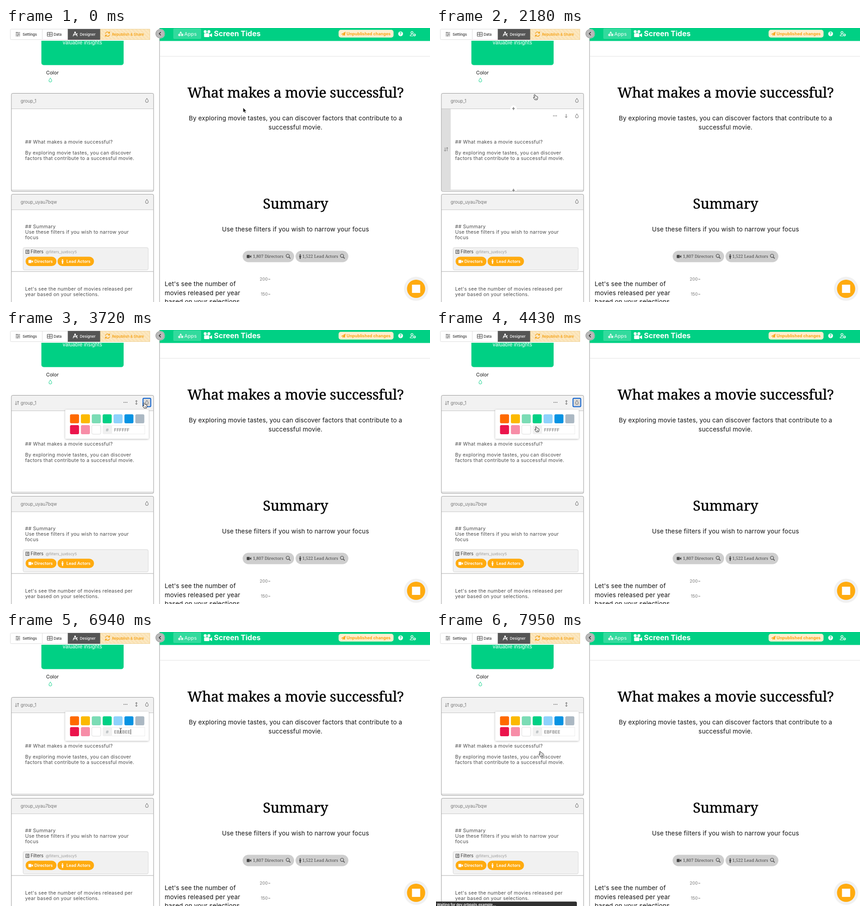
Recreate the animation shown at these times as an HTML page. Size 930 px wide and 602 px high, loop 8000 ms.

```html
<!DOCTYPE html>
<html lang="en">
<head>
<meta charset="utf-8">
<title>Designer</title>
<style>
  html, body { margin: 0; width: 100%; height: 100%; overflow: hidden; background: #fff; }
  svg { display: block; width: 930px; height: 602px; }
  text { font-family: Inter, "Open Sans", sans-serif; white-space: pre; }
  .serif { font-family: "Noto Serif", serif; }
</style>
</head>
<body>
<svg id="stage" viewBox="0 0 930 602" xmlns="http://www.w3.org/2000/svg">
  <defs>
    <pattern id="stripes" width="6" height="6" patternUnits="userSpaceOnUse" patternTransform="rotate(-45)">
      <rect width="6" height="6" fill="#fce9c2"/>
      <rect width="3" height="6" fill="#fae1b4"/>
    </pattern>
    <filter id="shadow" x="-10%" y="-20%" width="120%" height="150%">
      <feDropShadow dx="0" dy="1" stdDeviation="2" flood-color="#000" flood-opacity=".28"/>
    </filter>
  </defs>
</svg>
<script>
const NS = 'http://www.w3.org/2000/svg';
const stage = document.getElementById('stage');
const GREEN = '#00d084', ORANGE = '#ffab10', GREY = '#777';
const LOOP = 8000;

function add(parent, tag, attrs = {}, content) {
  const node = document.createElementNS(NS, tag);
  for (const key in attrs) node.setAttribute(key, attrs[key]);
  if (content !== undefined) node.textContent = content;
  parent.appendChild(node);
  return node;
}
const group = (p, attrs) => add(p, 'g', attrs);
const at = (p, x, y) => group(p, { transform: `translate(${x} ${y})` });
const rect = (p, x, y, width, height, fill, more) => add(p, 'rect', { x, y, width, height, fill, ...more });
const circle = (p, cx, cy, r, fill, more) => add(p, 'circle', { cx, cy, r, fill, ...more });
const fillPath = (p, d, fill) => add(p, 'path', { d, fill });
const linePath = (p, d, stroke, width = 1) => add(p, 'path', { d, stroke, fill: 'none', 'stroke-width': width });
const label = (p, x, y, size, fill, str, more) => add(p, 'text', { x, y, 'font-size': size, fill, ...more }, str);
const show = (node, on) => node.setAttribute('visibility', on ? 'visible' : 'hidden');

// Icons
const drop = (p, x, y, color) => linePath(at(p, x, y),
  'M0-4.4C1-2.3 3.1-.4 3.1 1.5A3.1 3.1 0 0 1-3.1 1.5C-3.1-.4-1-2.3 0-4.4Z', color);
const dots = (p, x, y) => [-3.3, 0, 3.3].forEach(d => circle(p, x + d, y, .9, '#666'));
const sorter = (p, x, y) => linePath(at(p, x, y),
  'M-2-4V4M-4 2L-2 4.2L-.4 2M2.4 4V-4M.8-2L2.4-4.2L4.2-2', GREY);
const plus = (p, x, y) => {
  circle(p, x, y, 7, '#fff');
  linePath(p, `M${x - 3.2} ${y}h6.4M${x} ${y - 3.2}v6.4`, '#555', 1.2);
};
const camera = (p, x, y, color) => {
  const g = at(p, x, y);
  rect(g, 0, 0, 6.6, 7, color, { rx: 1.2 });
  fillPath(g, 'M7 3L10 .6V6.4L7 4.2Z', color);
};
const person = (p, x, y, color) => {
  const g = at(p, x, y);
  circle(g, 0, -3.8, 1.3, color);
  fillPath(g, 'M-1.9-2H1.9V1.6H1.2V5.2H-1.2V1.6H-1.9Z', color);
};
const lens = (p, x, y) => {
  circle(p, x - 1, y - 1, 3.6, 'none', { stroke: '#444', 'stroke-width': 1.2 });
  linePath(p, `M${x + 1.6} ${y + 1.6}l3.2 3.2`, '#444', 1.5);
};

// Sidebar
const side = group(stage);
const dim = rect(side, 8, 28, 319, 574, '#868686');
rect(side, 77.6, 10, 180.4, 71.5, GREEN, { rx: 5 });
label(side, 167.5, 36, 11, '#fff', 'valuable insights', { 'text-anchor': 'middle' });
label(side, 88, 101.5, 10.8, '#111', 'Color');
drop(side, 97.3, 114.1, GREEN);

function card(y, height, name) {
  rect(side, 12, y, 311.5, height, '#fff', { rx: 3 });
  rect(side, 12.5, y + .5, 311, 33, '#f2f2f2');
  linePath(side, `M12 ${y + 34}H323`, '#c4c4c4');
  label(side, 32, y + 20.3, 9.8, GREY, name);
}
const outline = (y, height) => rect(side, 11.8, y, 312, height, 'none', { rx: 3, stroke: '#999' });
const note = (y, ...lines) => lines.forEach((str, i) =>
  label(side, 42, y + i * 12, 10.6, '#4a4a4a', str, { 'letter-spacing': .29 }));

card(143.5, 215.5, 'group_1');
rect(side, 12, 356, 311, 3, '#f2f2f2');
linePath(side, 'M12 356H323', '#c4c4c4');

const bodyHover = group(side);
rect(bodyHover, 12.3, 178, 20, 177.5, '#dedede');
sorter(bodyHover, 22, 266.5);
plus(bodyHover, 170, 177);
plus(bodyHover, 170, 356.5);
dots(bodyHover, 261, 193);
linePath(bodyHover, 'M285.5 189V197M283 194.5L285.5 197L288 194.5', '#666');
drop(bodyHover, 309, 193, '#666');

outline(143.5, 215.5);
note(254, '## What makes a movie successful?');
note(277.7, 'By exploring movie tastes, you can discover', 'factors that contribute to a successful movie.');

const headHover = group(side);
sorter(headHover, 24, 160.3);
dots(headHover, 262, 159);
linePath(headHover, 'M286 155V163.4M283.8 157L286 154.7L288.2 157M283.8 161.4L286 163.7L288.2 161.4', '#555');
const focus = rect(side, 300.5, 150, 17, 18.5, '#d9d9d9', { rx: 2, stroke: '#0a60d0', 'stroke-width': 2 });
const headDrop = drop(side, 309, 158.9, '#666');

card(365.3, 250, 'group_uyau7bqw');
outline(365.3, 250);
drop(side, 309, 380.9, '#666');
note(440, '## Summary', 'Use these filters if you wish to narrow your', 'focus');
rect(side, 37.5, 482.5, 274.5, 49, '#f1f1f1', { rx: 3, stroke: '#d8d8d8' });
rect(side, 43.5, 488, 7, 7.5, 'none', { stroke: '#444' });
linePath(side, 'M45 490.5h4M45 493h2.5M48 488v7', '#444', .8);
label(side, 54, 495.3, 9.7, '#333', 'Filters');
label(side, 87, 495, 8.1, '#999', '@filters_jux6scy5');
function chip(x, width, textX, str) {
  rect(side, x, 502.6, width, 20.4, ORANGE, { rx: 10.2 });
  label(side, textX, 516.2, 9.1, '#fff', str, { 'font-weight': 600 });
}
chip(43, 67.7, 62.3, 'Directors');
chip(113, 80, 132.5, 'Lead Actors');
camera(side, 49.3, 509.5, '#fff');
person(side, 124, 513, '#fff');
linePath(side, 'M12 535H323', '#aaa');
note(576.7, "Let's see the number of movies released per", 'year based on your selections.');

// Colour picker
const picker = group(side);
rect(picker, 130, 175, 183, 64, '#fff', { rx: 2, filter: 'url(#shadow)' });
['#ff6900', '#fcb900', '#7bdcb5', '#00d084', '#8ed1fc', '#0693e3', '#abb8c3', '#eb144c', '#f78da7', '#fff']
  .forEach((fill, i) => rect(picker, 140.4 + i % 7 * 23.87, i < 7 ? 185.2 : 209.1, 19.8, 19.8, fill,
    { rx: 3, stroke: fill === '#fff' ? '#d2d2d2' : 'none', 'stroke-width': .8 }));
rect(picker, 212, 209, 20, 20, '#f0f0f0', { rx: 3 });
label(picker, 222, 222.6, 9.6, '#98a1a4', '#', { 'text-anchor': 'middle' });
rect(picker, 232, 209.5, 72.5, 19, 'none', { stroke: '#ececec' });
const selection = rect(picker, 237, 212.5, 35, 13, '#b3d7fe');
const hex = label(picker, 237, 222.6, 9.6, '#666', '');
const caret = rect(picker, 273.2, 213.5, 1, 11.5, '#333');

// Toolbar
const bar = group(stage);
rect(bar, 0, 0, 337, 28, '#fff');
rect(bar, 9.5, 2.5, 306, 23, '#fff', { rx: 2, stroke: '#ddd' });
linePath(bar, 'M79.5 2V26', '#ddd');
rect(bar, 135.5, 2, 71.5, 24, '#555');
rect(bar, 207, 2.5, 108.5, 23, 'url(#stripes)', { stroke: '#f0d398' });
const tab = (x, str, fill, weight = 500) => label(bar, x, 16.8, 8, fill, str, { 'font-weight': weight });
tab(36.5, 'Settings', '#333');
tab(104.5, 'Data', '#333');
tab(162, 'Designer', '#fff');
tab(232.5, 'Republish & Share', '#f5a216', 600);
linePath(bar, 'M21 10H31M21 13.5H31M21 17H31M24 8.7v2.6M28 12.2v2.6M25 15.7v2.6', '#444');
linePath(bar, 'M90.5 9.5H101.5V18H90.5ZM96 9.5V18M90.5 13.7H101.5', '#444');
linePath(bar, 'M147 18L151.5 9.5L156.5 18M147.5 13.5Q152 17 157 12', '#fff', 1.5);
circle(bar, 151.5, 9.3, 1.6, '#fff');
linePath(bar, 'M218 12.5A4.8 4.8 0 0 1 226.5 10.5M227.3 14.5A4.8 4.8 0 0 1 218.8 16.5M227.3 7.8V11.3H223.8M218 19.2V15.7H221.5', '#f5a216', 1.3);

// Preview
const page = group(stage);
rect(page, 337, 28, 593, 574, '#fff');
linePath(page, 'M338 62.2H930', '#e2e2e2');
rect(page, 337, 0, 593, 28.5, GREEN);
linePath(page, 'M336.8 0V602', '#999');
circle(page, 338, 12.5, 10.5, '#eee');
circle(page, 338, 12.5, 9.5, '#bababa', { stroke: '#8e8e8e' });
linePath(page, 'M339.5 9L336 12.5L339.5 16', '#222', 1.4);
rect(page, 367, 1, 61, 23, '#fff', { rx: 2, opacity: .2 });
const apps = group(page, { opacity: .8 });
fillPath(apps, 'M383.2 7L386.2 12H380.2Z', '#fff');
circle(apps, 380.3, 15.3, 2.7, '#fff');
rect(apps, 384, 12.7, 4.8, 4.8, '#fff');
label(apps, 391, 16.9, 11, '#fff', 'Apps', { 'font-weight': 500 });

circle(page, 437, 8, 3.3, '#fff');
circle(page, 445, 8, 3.3, '#fff');
rect(page, 434.5, 11.5, 11.5, 8.5, '#fff', { rx: 1.5 });
fillPath(page, 'M446.8 14.6L452 11.5V20L446.8 17Z', '#fff');
label(page, 456, 18.2, 16, '#fff', 'Screen Tides', { 'font-weight': 700 });
rect(page, 729.5, 4, 120.5, 17, '#ffefcf', { rx: 5 });
fillPath(page, 'M735 13.5L745 8L743.2 17L739.8 15.5L738.3 18V14.8L742.5 10.5L737.3 14.6Z', '#f9a51a');
label(page, 747, 15.7, 9.1, '#f9a51a', 'Unpublished changes', { 'font-weight': 700 });
circle(page, 865.5, 12.7, 5.2, '#fff');
label(page, 865.5, 15.8, 8.5, GREEN, '?', { 'font-weight': 700, 'text-anchor': 'middle' });
circle(page, 890.5, 10.2, 2.4, 'none', { stroke: '#fff', 'stroke-width': 1.2 });
linePath(page, 'M886.3 17.5Q886.5 14 890.5 14H892M886.3 17.5H893', '#fff', 1.2);
circle(page, 896, 15.2, 2, 'none', { stroke: '#fff', 'stroke-width': 1.6 });

const centred = (y, str, size, more) => label(page, 635, y, size, '#111', str, { 'text-anchor': 'middle', ...more });
const heading = (y, str) => centred(y, str, 31, {
  class: 'serif', 'letter-spacing': -.22, fill: '#000', stroke: '#000', 'stroke-width': .45
});
const body = { 'letter-spacing': .2 };
heading(153, 'What makes a movie successful?');
centred(203.3, 'By exploring movie tastes, you can discover factors that contribute to a', 13.5, body);
centred(223.3, 'successful movie.', 13.5, body);
heading(397, 'Summary');
centred(447.2, 'Use these filters if you wish to narrow your focus', 13.5, body);
["Let's see the number of", 'movies released per year', 'based on your selections.']
  .forEach((str, i) => label(page, 348, 566.7 + i * 19.8, 13.5, '#111', str, body));

function pill(x, width, textX, str) {
  rect(page, x, 489.5, width, 25, '#cecece', { rx: 12.5 });
  label(page, textX, 505.4, 9.4, '#444', str, { class: 'serif' });
  lens(page, x + width - 13, 501.6);
}
pill(519, 113, 541.5, '1,807 Directors');
pill(635, 116, 650, '1,522 Lead Actors');
camera(page, 528, 498.5, '#444');
person(page, 645.3, 502, '#444');

[200, 150].forEach((n, i) => {
  const y = 552 + i * 33;
  label(page, 574, y + 3.4, 9.3, GREY, n, { 'text-anchor': 'end' });
  linePath(page, `M575.5 ${y}H579.5`, '#666');
});

circle(page, 899.5, 573, 26.5, '#f1f1f1');
circle(page, 899.5, 573, 20, ORANGE);
rect(page, 890.5, 564, 18, 18, '#fff');

const status = group(stage);
rect(status, -4, 592.3, 313, 14, '#303030', { rx: 3 });
label(status, 2, 601.6, 7.7, '#fff', 'Waiting for dev.orbpails.example...', { 'font-weight': 600 });

// Pointers, each drawn around its own anchor
const arrow = group(stage);
add(arrow, 'path', { d: 'M0 0V10.6L2.5 8.4L4.2 12.2L6 11.4L4.4 7.8H7.6Z', fill: '#111', stroke: '#fff', 'stroke-width': .8 });
const hand = group(stage);
add(hand, 'path', {
  d: 'M-2.5-5.5Q-1.5-6.6-.7-5.3L.2-2.3Q1.4-3.2 2-2Q3.2-2.7 3.7-1.4Q5-1.6 5-.1V2.5L4 5.7H-1.2L-4.2 1.2Q-4.5-.3-3-.1L-1.6 1L-3-4.5Z',
  fill: '#fff', stroke: '#222', 'stroke-width': 1, 'stroke-linejoin': 'round'
});
linePath(hand, 'M.7 1.5V4M2.3 1.5V4', '#222', .7);
const beam = group(stage);
const beamShape = 'M-2.5-5.5Q0-5.5 0-4V4Q0 5.5-2.5 5.5M2.5-5.5Q0-5.5 0-4V4Q0 5.5 2.5 5.5M-1.3 1.5H1.3';
linePath(beam, beamShape, '#fff', 2.4);
linePath(beam, beamShape, '#222', 1);
const pointers = { arrow, hand, beam };

// Each move: first step, last step, number of steps, target, pointer
const moves = [
  [0, 0, 1, 520, 175, 'arrow'],
  [1200, 1200, 1, 507, 178, 'arrow'],
  [1340, 1580, 3, 345, 205, 'arrow'],
  [1700, 2060, 4, 219, 172, 'hand'],
  [2180, 2180, 1, 218, 152, 'hand'],
  [2300, 2540, 3, 321, 164, 'hand'],
  [2780, 2780, 1, 297, 162, 'hand'],
  [2900, 3010, 2, 310.5, 163, 'hand'],
  [3120, 3120, 1, 309, 163, 'hand'],
  [3720, 4430, 7, 221, 218, 'hand'],
  [4550, 4670, 2, 211, 221, 'hand'],
  [4790, 4910, 2, 230, 220, 'hand'],
  [5030, 5030, 1, 247, 218, 'beam'],
  [5380, 5380, 1, 251.5, 217, 'beam'],
  [7330, 7330, 1, 220, 269, 'hand'],
  [7950, 7950, 1, 230, 268, 'hand']
];

function movePointer(t) {
  let i = moves.length - 1;
  while (moves[i][0] > t) i--;
  const [first, last, steps, x, y, kind] = moves[i];
  const [, , , x0, y0] = moves[Math.max(0, i - 1)];
  const gap = steps > 1 ? (last - first) / (steps - 1) : 1;
  const step = Math.min(steps, Math.floor((t - first) / gap + .06) + 1);
  const f = step / steps;
  const eased = steps > 3 ? f * f * (3 - 2 * f) : f;
  for (const name in pointers) show(pointers[name], name === kind);
  pointers[kind].setAttribute('transform', `translate(${x0 + (x - x0) * eased} ${y0 + (y - y0) * eased})`);
}

function render(t) {
  const within = (a, b) => t >= a && t < b;
  show(bodyHover, within(1700, 2300));
  show(headHover, t >= 2300);
  show(focus, within(3360, 5380));
  show(headDrop, t < 7060);
  show(picker, t >= 3360);
  picker.setAttribute('opacity', within(3360, 3480) ? .6 : 1);
  hex.textContent = t < 6820 ? 'FFFFFF' : 'EBFBEE';
  show(selection, within(5500, 6820));
  show(caret, within(5380, 5500) || within(6820, 7330));
  dim.setAttribute('opacity', within(7180, 7680) ? 1 : within(7060, 7180) ? .5 : 0);
  show(status, t >= 7950);
  movePointer(t);
}

const start = performance.now();
function tick() {
  render((performance.now() - start) % LOOP);
  requestAnimationFrame(tick);
}
tick();
</script>
</body>
</html>
```
